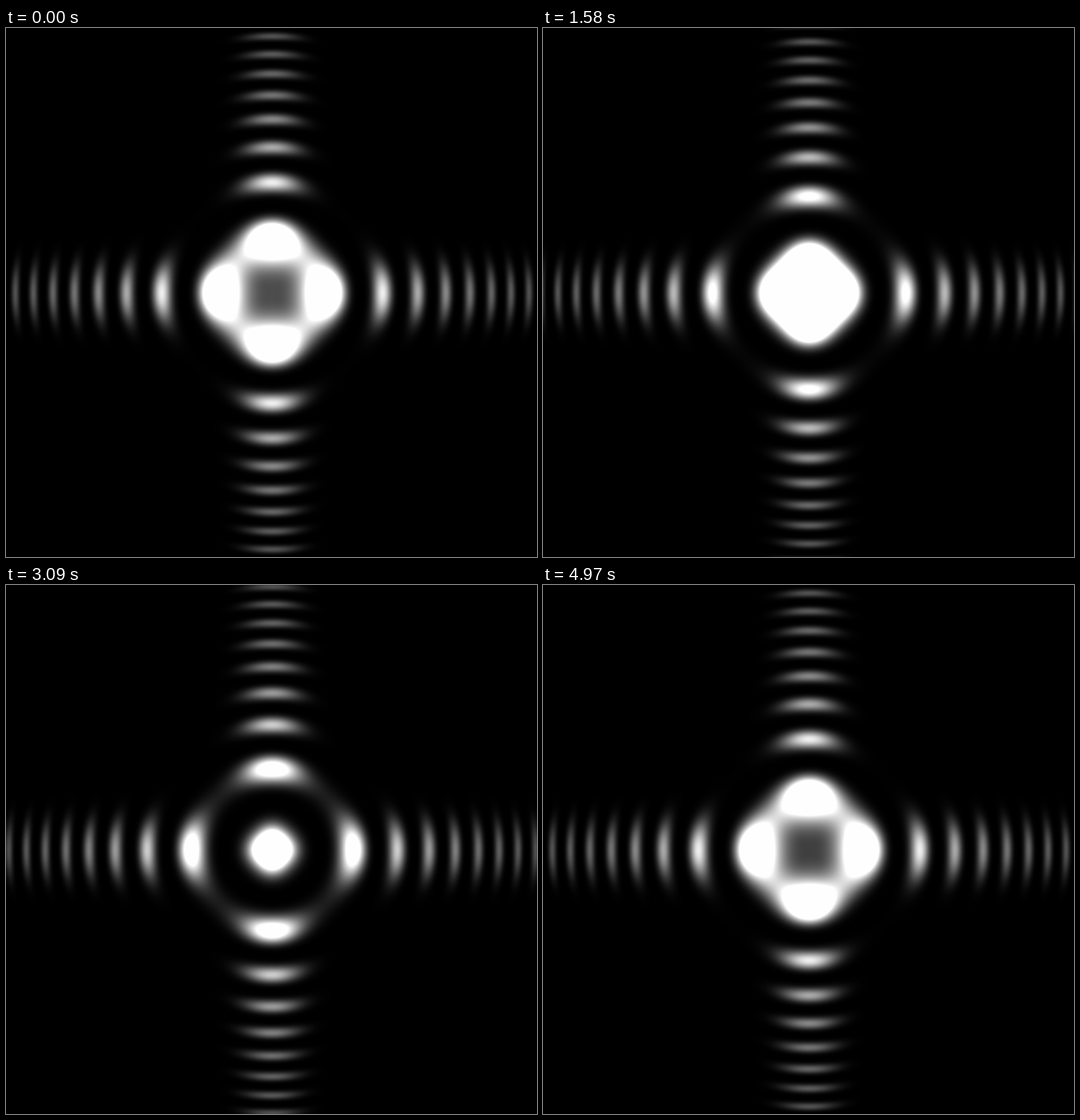
An HTML page with a canvas that plays this animation: 749x747 px, repeating every 5000 ms.

```html
<!DOCTYPE html>
<html lang="en">
<head>
<meta charset="utf-8">
<title>Wave cross</title>
<style>
  html, body { margin: 0; width: 100%; height: 100%; overflow: hidden; background: #000; }
  canvas { display: block; }
</style>
</head>
<body>
<canvas id="stage" width="749" height="747"></canvas>
<script>
const W = 749, H = 747, CX = 375, CY = 373.5;
const LOOP = 5000, STEPS = 165;
const PERIOD = 17800;  // ring spacing, measured in squared radius
const START = 24480;   // squared radius of a crest at time zero
const GAIN = 171600;   // overall brightness
const CORE = 382;      // squared radius that softens the peak at the centre

const ctx = document.getElementById('stage').getContext('2d');
const image = ctx.createImageData(W, H);
const pixels = new Uint32Array(image.data.buffer);

// Brightness is glow * cos⁴(wave); its parts that do not depend on time are kept here.
const light = new Float32Array(W * H);
const cosPart = new Float32Array(W * H);
const sinPart = new Float32Array(W * H);

function glow(x2, y2) {
  const r2 = x2 + y2;
  const off = r2 ? x2 * y2 / r2 : 0;  // distance from the arms
  return GAIN * Math.exp(-off * (6.5e-4 + 6e-8 * off)) / (CORE + r2) ** 0.65;
}

for (let y = 0, i = 0; y < H; y++) {
  for (let x = 0; x < W; x++, i++) {
    const x2 = (x - CX) ** 2, y2 = (y - CY) ** 2;
    const angle = 2 * Math.PI * (x2 + y2) / PERIOD;
    light[i] = glow(x2, y2);
    cosPart[i] = Math.cos(angle) / 2;
    sinPart[i] = Math.sin(angle) / 2;
  }
}

function draw(step) {
  const angle = 2 * Math.PI * (START / PERIOD - step / STEPS);
  const c = Math.cos(angle), s = Math.sin(angle);
  for (let i = 0; i < pixels.length; i++) {
    const wave = 0.5 + c * cosPart[i] + s * sinPart[i];
    const v = Math.min(254, light[i] * wave * wave + 0.5) | 0;
    pixels[i] = 0xff000000 | v * 0x010101;
  }
  ctx.putImageData(image, 0, 0);
}

const begin = performance.now();
let shown = -1;

function tick() {
  const time = Math.max(0, performance.now() - begin) % LOOP;
  const step = Math.floor((time + 5) * STEPS / LOOP) % STEPS;
  if (step !== shown) draw(shown = step);
  requestAnimationFrame(tick);
}
tick();
</script>
</body>
</html>
```
